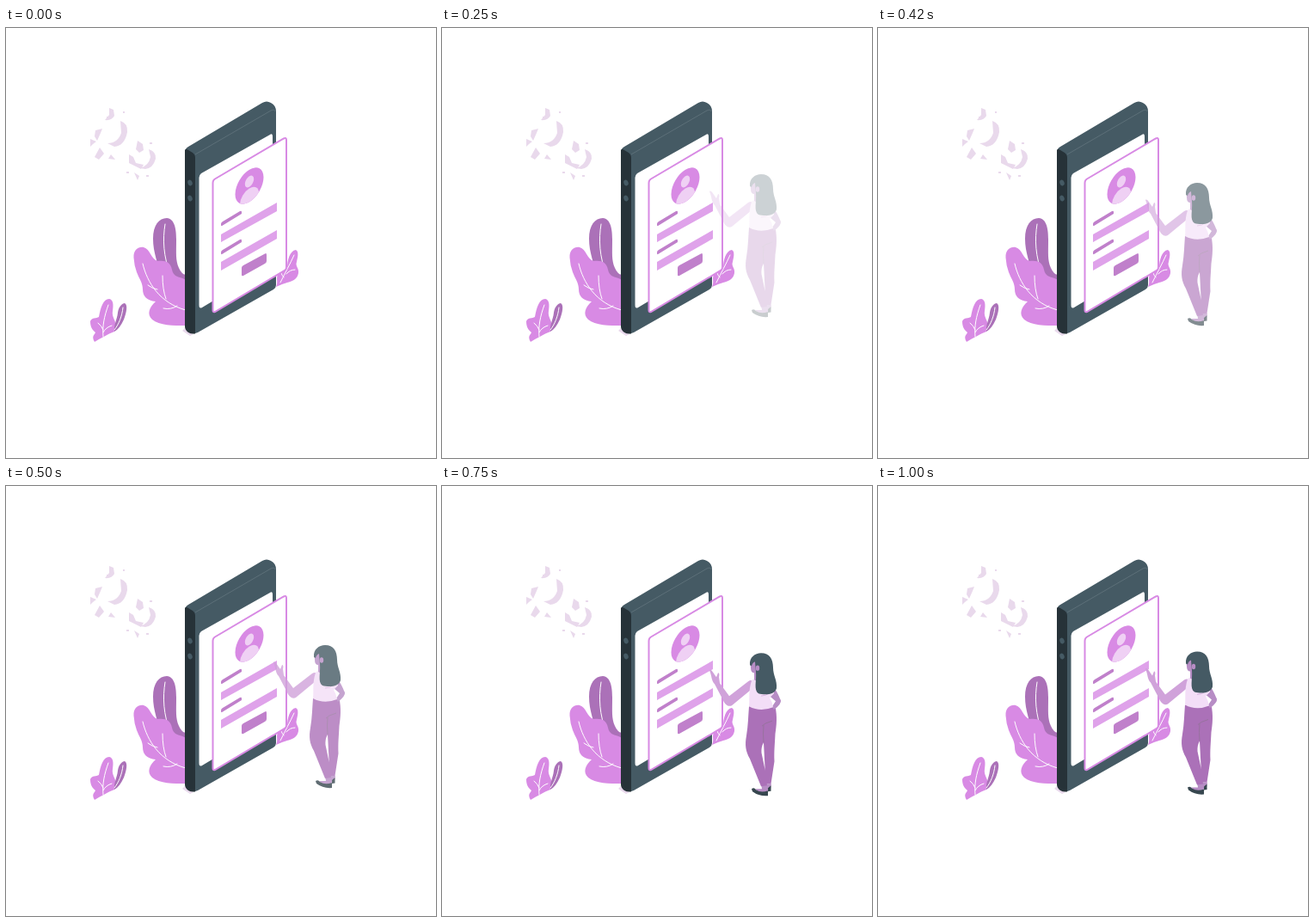
These frames come from a looping animation (500 by 500 pixels, 1040 ms). An HTML page:

```html
<!DOCTYPE html>
<html lang="en">
<head>
<meta charset="utf-8">
<title>Phone sign-up form</title>
<style>
  html, body { margin: 0; width: 100%; height: 100%; overflow: hidden; background: #fff; }
  svg { display: block; width: 100%; height: 100%; }
  .pink { fill: #d88ae4; }
  .plum { fill: #ab71b8; }
  .mist { fill: #e9d9ec; }
  .slate { fill: #455a64; }
  .dark { fill: #263238; }
  .skin { fill: #b78dc5; }
  .bar { fill: #dfa2ea; }
  .mauve { fill: #c080cb; }
  .vein { fill: none; stroke: #fff; stroke-width: 1; stroke-linecap: round; }
</style>
</head>
<body>
<svg viewBox="0 0 500 500">
  <!-- broken gears -->
  <path class="mist" d="M120 93L125 95 126 102Q123 108 115 107L120 101Z
    M133 108Q142 111 141 121Q138 137 126 138L118 134Q130 134 134 122Z
    M104 119L112 117 110 122 106 131 103 126Z M98 129L105 132 101 135 98 138Z
    M109 139L114 146 108 153 103 150Z M122 147L127 153 119 152Z
    M166 141Q175 144 174 152Q171 163 162 164L156 163Q166 160 168 150Z
    M153 131L159 135 160 142 155 145 151 141Z M143 147L148 150 151 157 160 159 157 164 149 160 143 157Z
    M149 168L155 172 153 177Z M140 167h3v2h-3z M163 171h3v2h-3z M167 133h3v2h-3z
    M136 97h2v2h-2z M117 103h2v2h-2z"/>

  <!-- large leaves -->
  <path class="plum" d="M171 245C171 229 178 221 187 221C196 222 198 233 198 246C198 262 197 270 201 279Q204 286 209 287V304L180 292C177 272 171 262 171 245Z"/>
  <path class="vein" d="M185 228C182 246 183 266 191 286"/>
  <path class="pink" d="M148.500 267C148 258 154 254 160 255C168 257 168 268 176 271C186 270 191 272 193 281C195 291 204 289 209 293V346C195 346 178 346 170 339C163 333 167 324 174 318C164 317 159 312 159 304C159 296 155 292 152 284Q149 276 148.500 267Z"/>
  <path class="vein" d="M159 274C164 296 179 320 209 328M182 288Q182 304 186 315M183 326Q192 328 199 323M165 299Q170 303 176 304"/>

  <!-- left plant -->
  <path class="pink" d="M103 365C99 358 103 357 104 354C100 351 98 347 98 341C100 336 105 338 108 336C110 325 113 315 120 315C125 316 125 322 124 329C123 335 126 338 127 342Q128 348 126 353C118 356 110 361 103 365Z"/>
  <path class="plum" d="M126 353C125 345 129 340 130 331C131 324 135 320 138 320C142 322 140 331 137 339Q132 350 126 353Z"/>
  <path class="vein" d="M119 322C114 336 112 346 113 359M107 343Q111 346 113 351M123 346Q116 348 113 354M136 325C135 335 131 345 126 351"/>

  <!-- right plant -->
  <path class="pink" d="M314 301C317 295 313 290 317 285L327 279C327 270 330 259 337 258C341 260 339 267 338 272C336 277 341 279 340 285C339 291 335 294 327 296Q320 298 314 301Z"/>
  <path class="vein" d="M335 264C330 275 325 284 319 296M336 281Q330 281 326 286M319 283Q321 288 323 290"/>

  <!-- phone -->
  <path class="slate" d="M208 145Q208 140 212 138L298 87Q303 84 308 87Q314 90 314 97V299Q314 302 311 304L223 354Q216 357 211 353Z"/>
  <path class="mist" d="M205 352L208 349 213 354 218 356 214 358Z"/>
  <path class="dark" d="M208 142Q209 140 212 142L217 145Q220 147 220 151V355.500Q215 356 212 354Q208 351 208 347Z"/>
  <path d="M220 147L308 96Q312 94 313 97" fill="none" stroke="#62757e" stroke-width=".8"/>
  <g class="slate">
    <ellipse cx="214" cy="180" rx="2.600" ry="3.500" transform="rotate(-20 214 180)"/>
    <ellipse cx="214" cy="198" rx="2.600" ry="3.500" transform="rotate(-20 214 198)"/>
  </g>
  <path fill="#fff" d="M224.500 174Q224.500 171 227 169L307 124Q310 122 310 126V276L228 325Q224.500 327 224.500 322Z"/>

  <!-- form card -->
  <path fill="#fff" stroke="#d88ae4" stroke-width="2" d="M240.500 180Q240.500 177 243 175.500L323 128.500Q326 127 326 130V278Q326 281 324 282L243 330Q240.500 331 240.500 328Z"/>
  <clipPath id="badge"><ellipse rx="16.500" ry="18.700"/></clipPath>
  <g transform="matrix(1 -.6 0 1 283 183.500)">
    <ellipse class="pink" rx="16.500" ry="18.700"/>
    <g fill="#efd0f4" clip-path="url(#badge)">
      <ellipse cy="-5" rx="5.200" ry="6.200"/>
      <ellipse cy="15" rx="11" ry="12"/>
    </g>
  </g>
  <path class="mauve" d="M250 228Q250 226 252 225L272 213Q274 212 274 214V216L252 229.500Q250 231 250 229Z
    M250 261Q250 259 252 258L272 246Q274 245 274 247V249L252 262.500Q250 264 250 262Z
    M274 279Q274 277 276 276L301 262.500Q303 261 303 264V271Q303 273 301 274L276 288Q274 289 274 287Z"/>
  <path class="bar" d="M250 240L315 203V213L250 249ZM250 272L315 235V245L250 282Z"/>

  <!-- first faint glimpse of the legs -->
  <path id="glimpse" class="mist" d="M354 263L367 267 368 279 372 291 375 281 374 265 387 270 385 295 381 317 373 319 365 301 355 279Z
    M361 324L371 327 381 326 381 322 382 330 379 332 369 331 361 327Z"/>

  <g id="woman">
    <path class="skin" d="M371 346H383L382 352 379 353 378 356 370 357 364 352 372 352Z"/>
    <path fill="#37474f" d="M360 352Q363 350 365 353Q371 357 379 354V360Q369 361 361 355ZM379 351L382.500 348V354.500L379 355Z"/>
    <path class="plum" d="M357 256H387.500C390 268 389 278 387.500 288C387 300 386 308 386.500 320L382.500 346H376.500L374 298Q371 303 371.500 310Q376 328 378 348L371 349 358 317C353 308 352 301 354 290C356 278 356 268 357 256Z"/>
    <path d="M372 279L376 276 384 273M374 278Q373 288 374 298" fill="none" stroke="#98729f" stroke-width="1"/>
    <path class="skin" d="M383 234C389 235 391 243 394 249Q395 253 386 260L384 256 388 250 381 244Z"/>
    <path fill="#d0a2da" d="M311 214C313 212 316 218 319 222L321 217Q323 217 322 222L323 229 334 244 356 227C362 223 364 231 360 236L337 255C333 257 329 254 327 249L317 230C313 226 314 221 311 214Z"/>
    <path fill="#f3def7" d="M360 226C365 221 379 222 386 236V241L381 246Q384 251 385 257Q370 263 357 256C358 248 356 238 360 226Z"/>
    <path d="M371 244Q377 244 381 240" fill="none" stroke="#d9b5df"/>
    <path class="skin" d="M361 200Q358 205 359 211Q359 217 363 217V225Q366 228 370 223V203Z"/>
    <path class="slate" d="M358 208C357 199 364 194 371 194C381 194 385 201 385 211C385 220 390 226 389 235C387 243 375 243 368 241C362 237 366 226 365 216L364 204Q361 205 360 209Z"/>
    <ellipse class="skin" cx="367" cy="211.500" rx="2.200" ry="3.200"/>
  </g>
</svg>
<script>
  const LOOP = 1040;
  const steps = [170, 210, 250, 290, 330, 380, 420, 460, 500, 540, 580,
    630, 670, 710, 750, 790, 830, 870, 920, 960, 1000];
  const woman = document.getElementById("woman");
  const glimpse = document.getElementById("glimpse");

  function draw(now) {
    const t = now % LOOP;
    const k = steps.filter(s => s <= t).length - 1;
    glimpse.style.display = k === 0 ? "" : "none";
    woman.style.display = k > 0 ? "" : "none";

    // linear drop-in, then a gentle bob
    const drop = -29 + 2.5 * k;
    const bob = 0.2 - 1.7 * ((k - 15) / 5) ** 2;
    woman.setAttribute("transform", `translate(0 ${k < 15 ? Math.min(drop, bob) : bob})`);
    woman.setAttribute("opacity", Math.min(1, (k + 1) / 11.3));
    requestAnimationFrame(draw);
  }
  draw(0);
</script>
</body>
</html>
```
